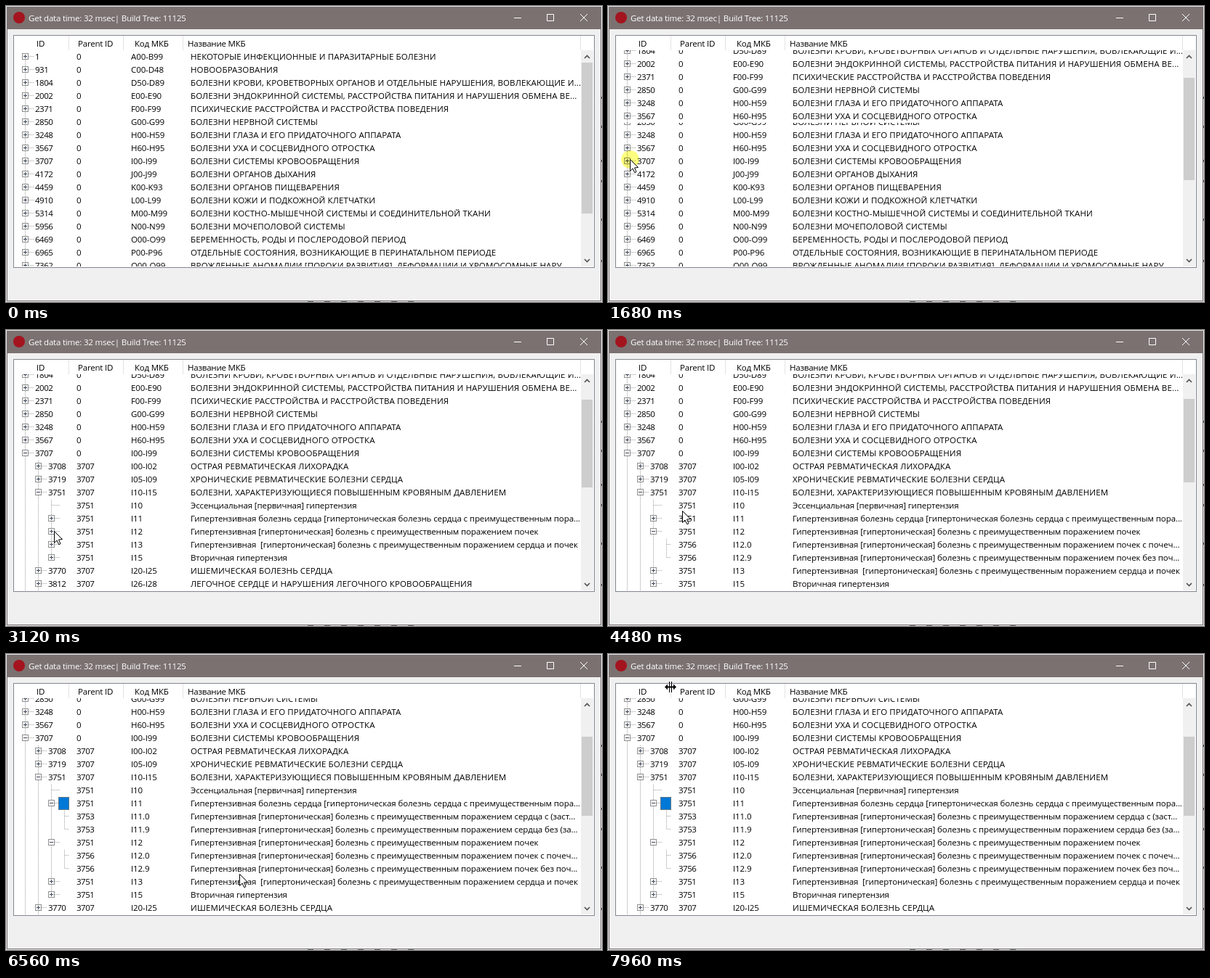
Write an HTML page with a canvas that moves like this. It is 820 by 408 pixels and loops after 8000 ms.

```html
<!DOCTYPE html>
<html lang="ru">
<head>
<meta charset="utf-8">
<style>
html, body { margin: 0; width: 100%; height: 100%; overflow: hidden; }
canvas { display: block; }
</style>
</head>
<body>
<canvas id="stage" width="820" height="408"></canvas>
<script>
const ctx = document.getElementById('stage').getContext('2d');
const LOOP = 8000, ROW = 18, TOP = 61, BOTTOM = 359, HIDDEN_ROWS = 4;

// Indentation is the tree level: id, code, name.
const source = `1 A00-B99 НЕКОТОРЫЕ ИНФЕКЦИОННЫЕ И ПАРАЗИТАРНЫЕ БОЛЕЗНИ
931 C00-D48 НОВООБРАЗОВАНИЯ
1804 D50-D89 БОЛЕЗНИ КРОВИ, КРОВЕТВОРНЫХ ОРГАНОВ И ОТДЕЛЬНЫЕ НАРУШЕНИЯ, ВОВЛЕКАЮЩИЕ И...
2002 E00-E90 БОЛЕЗНИ ЭНДОКРИННОЙ СИСТЕМЫ, РАССТРОЙСТВА ПИТАНИЯ И НАРУШЕНИЯ ОБМЕНА ВЕ...
2371 F00-F99 ПСИХИЧЕСКИЕ РАССТРОЙСТВА И РАССТРОЙСТВА ПОВЕДЕНИЯ
2850 G00-G99 БОЛЕЗНИ НЕРВНОЙ СИСТЕМЫ
3248 H00-H59 БОЛЕЗНИ ГЛАЗА И ЕГО ПРИДАТОЧНОГО АППАРАТА
3567 H60-H95 БОЛЕЗНИ УХА И СОСЦЕВИДНОГО ОТРОСТКА
3707 I00-I99 БОЛЕЗНИ СИСТЕМЫ КРОВООБРАЩЕНИЯ
 3708 I00-I02 ОСТРАЯ РЕВМАТИЧЕСКАЯ ЛИХОРАДКА
 3719 I05-I09 ХРОНИЧЕСКИЕ РЕВМАТИЧЕСКИЕ БОЛЕЗНИ СЕРДЦА
 3751 I10-I15 БОЛЕЗНИ, ХАРАКТЕРИЗУЮЩИЕСЯ ПОВЫШЕННЫМ КРОВЯНЫМ ДАВЛЕНИЕМ
  3752 I10 Эссенциальная [первичная] гипертензия
  3753 I11 Гипертензивная болезнь сердца [гипертоническая болезнь сердца с преимущественным пора...
   3754 I11.0 Гипертензивная [гипертоническая] болезнь с преимущественным поражением сердца с (заст...
   3755 I11.9 Гипертензивная [гипертоническая] болезнь с преимущественным поражением сердца без (за...
  3756 I12 Гипертензивная [гипертоническая] болезнь с преимущественным поражением почек
   3757 I12.0 Гипертензивная [гипертоническая] болезнь с преимущественным поражением почек с почеч...
   3758 I12.9 Гипертензивная [гипертоническая] болезнь с преимущественным поражением почек без поч...
  3759 I13 Гипертензивная  [гипертоническая] болезнь с преимущественным поражением сердца и почек
  3764 I15 Вторичная гипертензия
 3770 I20-I25 ИШЕМИЧЕСКАЯ БОЛЕЗНЬ СЕРДЦА
 3812 I26-I28 ЛЕГОЧНОЕ СЕРДЦЕ И НАРУШЕНИЯ ЛЕГОЧНОГО КРОВООБРАЩЕНИЯ
 3826 I30-I52 ДРУГИЕ БОЛЕЗНИ СЕРДЦА
 3963 I60-I69 ЦЕРЕБРОВАСКУЛЯРНЫЕ БОЛЕЗНИ
 4021 I70-I79 БОЛЕЗНИ АРТЕРИЙ, АРТЕРИОЛ И КАПИЛЛЯРОВ
 4082 I80-I89 БОЛЕЗНИ ВЕН, ЛИМФАТИЧЕСКИХ СОСУДОВ И ЛИМФАТИЧЕСКИХ УЗЛОВ
 4146 I95-I99 ДРУГИЕ И НЕУТОЧНЕННЫЕ БОЛЕЗНИ СИСТЕМЫ КРОВООБРАЩЕНИЯ
4172 J00-J99 БОЛЕЗНИ ОРГАНОВ ДЫХАНИЯ
4459 K00-K93 БОЛЕЗНИ ОРГАНОВ ПИЩЕВАРЕНИЯ
4910 L00-L99 БОЛЕЗНИ КОЖИ И ПОДКОЖНОЙ КЛЕТЧАТКИ
5314 M00-M99 БОЛЕЗНИ КОСТНО-МЫШЕЧНОЙ СИСТЕМЫ И СОЕДИНИТЕЛЬНОЙ ТКАНИ
5956 N00-N99 БОЛЕЗНИ МОЧЕПОЛОВОЙ СИСТЕМЫ
6469 O00-O99 БЕРЕМЕННОСТЬ, РОДЫ И ПОСЛЕРОДОВОЙ ПЕРИОД
6965 P00-P96 ОТДЕЛЬНЫЕ СОСТОЯНИЯ, ВОЗНИКАЮЩИЕ В ПЕРИНАТАЛЬНОМ ПЕРИОДЕ
7362 Q00-Q99 ВРОЖДЕННЫЕ АНОМАЛИИ [ПОРОКИ РАЗВИТИЯ], ДЕФОРМАЦИИ И ХРОМОСОМНЫЕ НАРУ...`;

const branch = [];
const nodes = source.split('\n').map(line => {
  const [, indent, id, code, name] = line.match(/^( *)(\d+) (\S+) (.+)$/);
  const level = indent.length;
  const node = { level, id, code, name, leaf: /\.|^I10$/.test(code) };
  branch.length = level;
  node.path = [...branch, node];
  branch.push(node);
  return node;
});
// A node is last when no sibling follows it under the same parent.
nodes.forEach((node, i) => {
  const next = nodes.slice(i + 1).find(n => n.level <= node.level);
  node.last = node.level > 0 && next.level < node.level;
});

const opened = [[1680, '3707'], [2560, '3751'], [3720, '3756'], [5880, '3753']];
const clicks = [[1600, 2040], [2520, 2720], [3640, 3880], [5040, 5240]];
const pointer = [
  [760, 222, 353], [1520, 30, 211], [2240, 30, 211], [2480, 44, 223], [2640, 44, 223],
  [3040, 60, 268], [3120, 66, 277], [3840, 66, 277], [4400, 92, 266], [4480, 102, 249],
  [5000, 319, 241], [5240, 319, 241], [5560, 325, 243], [5680, 325, 243], [6120, 322, 281],
  [6320, 321, 303], [7040, 321, 303], [7840, 84, 45], [7960, 86, 45]
];

function stateAt(t) {
  const open = opened.filter(([at]) => t >= at).map(([, id]) => id);
  return {
    open,
    rows: nodes.filter(n => n.path.slice(0, -1).every(p => open.includes(p.id))),
    scroll: t < 1680 ? 0 : t < 6560 ? 44 : 98,
    selected: t < 5080 ? '' : t < 5720 ? '3752' : '3753'
  };
}

function rect(color, x, y, w, h) {
  ctx.fillStyle = color;
  ctx.fillRect(x, y, w, h);
}

function text(str, x, y, spacing = -0.2, color = '#000') {
  ctx.font = '11.5px "Open Sans", "Noto Sans", sans-serif';
  ctx.letterSpacing = spacing + 'px';
  ctx.fillStyle = color;
  ctx.fillText(str, x, y);
}

function lines(color, width, ...paths) {
  ctx.strokeStyle = color;
  ctx.lineWidth = width;
  ctx.beginPath();
  for (const path of paths) path.forEach(([x, y], i) => i ? ctx.lineTo(x, y) : ctx.moveTo(x, y));
  ctx.stroke();
}

function disc(color, x, y, r) {
  ctx.fillStyle = color;
  ctx.beginPath();
  ctx.arc(x, y, r, 0, 7);
  ctx.fill();
}

function dotsDown(x, from, to) {
  for (let y = from + from % 2; y < to; y += 2) rect('#a0a0a0', x, y, 1, 1);
}

function drawRow(node, y, first, state) {
  const { level, path } = node;
  const x = 26 + level * 18, mid = y + 8;
  path.forEach((p, k) => {
    const own = k === level;
    if (own || !p.last) dotsDown(26 + k * 18, first ? mid : y, own && p.last ? mid : y + ROW);
  });
  for (let dx = 1; dx < 12 && x + dx < 87; dx += 2) rect('#a0a0a0', x + dx, mid, 1, 1);
  if (!node.leaf) {
    rect('#919191', x - 4, mid - 4, 9, 9);
    rect('#fbfbfb', x - 3, mid - 3, 7, 7);
    rect('#404858', x - 2, mid, 5, 1);
    if (!state.open.includes(node.id)) rect('#404858', x, mid - 2, 1, 5);
  }
  if (node.id === state.selected) {
    rect('#0078d7', 72, y, 15, ROW);
    ctx.setLineDash([1, 1]);
    ctx.lineWidth = 1;
    ctx.strokeStyle = '#c07830';
    ctx.strokeRect(72.5, y + 0.5, 14, ROW - 1);
    ctx.setLineDash([]);
  }
  const base = y + 13;
  if (level < 2) text(node.id, 40 + level * 18, base, -0.5);
  text(level ? path[level - 1].id : '0', 97, base, -0.5);
  text(node.code, 172, base, -0.1);
  text(node.name, 254, base, /[а-я]/.test(node.name) ? -0.1 : 0.13);
}

function drawRows(state, top, bottom) {
  ctx.save();
  ctx.beginPath();
  ctx.rect(11, top, 780, bottom - top);
  ctx.clip();
  state.rows.forEach((node, i) => {
    const y = TOP + i * ROW - state.scroll;
    if (y > top - ROW && y < bottom) drawRow(node, y, i === 0, state);
  });
  ctx.restore();
}

function drawScrollbar({ rows, scroll }) {
  const scale = 264 / (ROW * (rows.length + HIDDEN_ROWS));
  rect('#f0f0f0', 791, TOP, 17, BOTTOM - TOP);
  rect('#cdcdcd', 792, Math.round(78 + scroll * scale), 15, Math.round((BOTTOM - TOP) * scale));
  lines('#505050', 1.6, [[796, 72], [799.5, 68.5], [803, 72]], [[796, 349], [799.5, 352.5], [803, 349]]);
}

function drawWindow() {
  rect('#e8e8e8', 0, 0, 820, 408);
  rect('#7a7170', 1, 1, 818, 406);
  rect('#f0f0f0', 2, 32, 816, 374);
  for (let x = 415; x < 555; x += 23) rect('#777', x, 407, 8, 1);
  for (const y of [125, 165, 212, 240, 293, 350]) rect('#555', 819, y, 1, 3);
  disc('#a3141f', 18, 16, 8);
  text('Get data time: 32 msec| Build Tree: 11125', 31, 21, -0.2, '#fff');
  lines('#fff', 1, [[699, 16.5], [709, 16.5]],
    [[744.5, 11.5], [753.5, 11.5], [753.5, 20.5], [744.5, 20.5], [744.5, 11]],
    [[790, 11], [800, 21]], [[800, 11], [790, 21]]);

  rect('#828790', 10, 40, 800, 321);
  rect('#fff', 11, 41, 798, 319);
  for (const x of [86, 161, 243, 790]) rect('#e2e2e2', x, 41, 1, 20);
  text('ID', 42, 56);
  text('Parent ID', 99, 56);
  text('Код МКБ', 177, 56);
  text('Название МКБ', 250, 56);
}

function pointerAt(t) {
  const i = pointer.findIndex(([at]) => at > t);
  if (i < 0) return pointer.at(-1).slice(1);
  const [t0, x0, y0] = pointer[i - 1], [t1, x1, y1] = pointer[i];
  const u = (t - t0) / (t1 - t0), e = u * u * (3 - 2 * u);
  return [x0 + (x1 - x0) * e, y0 + (y1 - y0) * e].map(Math.round);
}

function polygon(points, fill, stroke) {
  ctx.beginPath();
  points.forEach(([x, y]) => ctx.lineTo(x, y));
  ctx.closePath();
  ctx.fillStyle = fill;
  ctx.fill();
  if (!stroke) return;
  ctx.strokeStyle = stroke;
  ctx.lineWidth = 1;
  ctx.stroke();
}

function drawPointer(t) {
  if (t < 760) return;
  const [x, y] = pointerAt(t);
  if (clicks.some(([from, to]) => t >= from && t < to)) {
    ctx.globalCompositeOperation = 'multiply';
    disc('rgba(255, 255, 0, .5)', x + 0.5, y + 0.5, 12.5);
    ctx.globalCompositeOperation = 'source-over';
  }
  ctx.save();
  ctx.translate(x, y);
  if (t < 7880) {
    polygon([[0.5, 0.5], [0.5, 16.5], [4, 13], [6.7, 18.7], [9, 17.7], [6.5, 12], [11.5, 11.5]], '#fff', '#000');
  } else {
    rect('#000', -2, -7, 1, 15);
    rect('#000', 1, -7, 1, 15);
    rect('#000', -6, -0.5, 12, 2);
    for (const side of [-1, 1]) polygon([[side * 8, 0.5], [side * 4, -3.5], [side * 4, 4.5]], '#000');
  }
  ctx.restore();
}

function draw(now) {
  const t = now % LOOP, state = stateAt(t);
  // The first scroll repaints only the upper part for a moment.
  const split = t >= 1680 && t < 1760 ? 161 : BOTTOM;
  drawWindow();
  drawRows(state, TOP, split);
  if (split < BOTTOM) drawRows(stateAt(0), split, BOTTOM);
  drawScrollbar(state);
  drawPointer(t);
  requestAnimationFrame(() => draw(performance.now() - start));
}

const start = performance.now();
draw(0);
</script>
</body>
</html>
```
